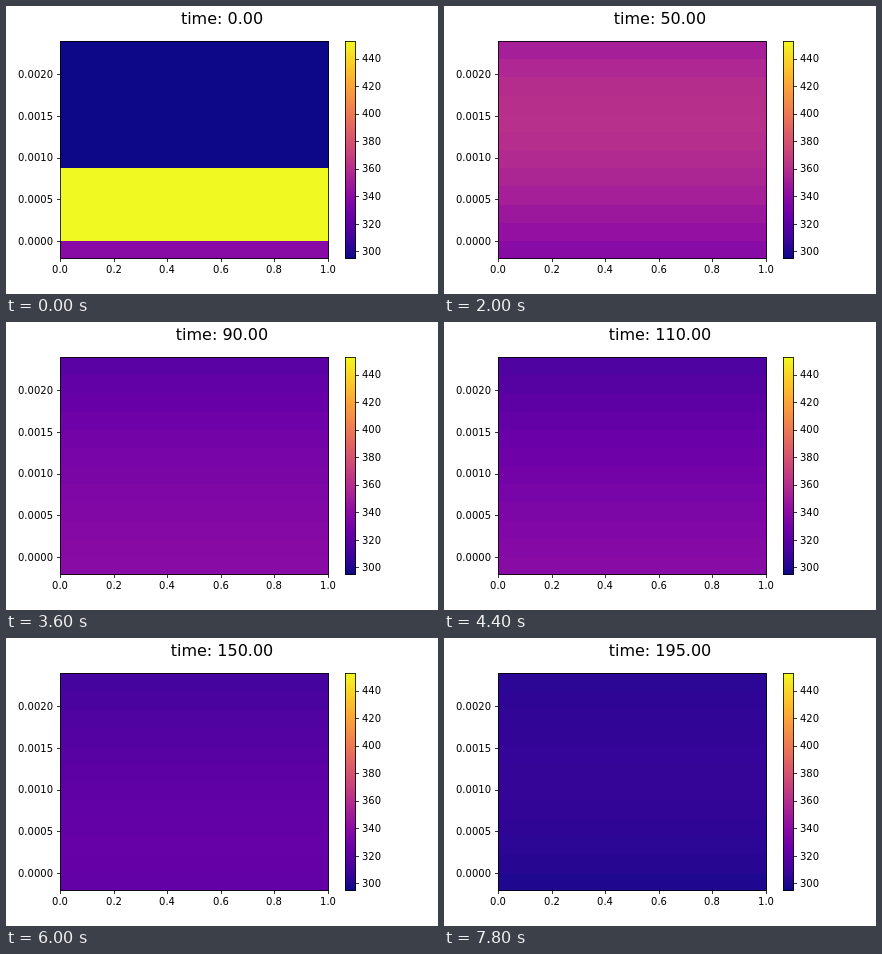
An HTML page for the animation above (8 s loop, 432 by 288 pixels).

```html
<!DOCTYPE html>
<html lang="en">
<head>
<meta charset="utf-8">
<title>Layer temperature</title>
<style>
  html, body { margin: 0; width: 100%; height: 100%; overflow: hidden; background: #fff; }
  svg { display: block; width: 432px; height: 288px; }
  text { font: 10px "DejaVu Sans", sans-serif; }
  #title { font-size: 16px; }
  .line { fill: none; stroke: #000; stroke-width: 0.8; }
</style>
</head>
<body>
<svg viewBox="0 0 432 288">
  <defs><linearGradient id="plasma" x1="0" y1="1" x2="0" y2="0"></linearGradient></defs>
  <g id="rows" shape-rendering="crispEdges"></g>
  <rect x="339" y="35" width="11" height="218" fill="url(#plasma)"/>
  <rect class="line" x="54.5" y="35.5" width="268" height="217"/>
  <rect class="line" x="339.5" y="35.5" width="10" height="217"/>
  <g id="axes"></g>
  <text id="title" x="216" y="18" text-anchor="middle"></text>
</svg>
<script>
const TOP = 34.56, BOTTOM = 252, LEFT = 54, WIDTH = 267.84;
const HEIGHT = BOTTOM - TOP;
const AMBIENT = 295.15, NOZZLE = 453.15, BED = 340;
const ROWS = 12, CELLS = 13, LAYER = 4;
const FRAMES = 40, FRAME_MS = 200, FRAME_SECONDS = 5;
const PLASMA = ['0d0887', '41049d', '6a00a8', '8f0da4', 'b12a90', 'cc4778',
  'e16462', 'f2844b', 'fca636', 'fcce25', 'f0f921']
  .map(hex => [0, 2, 4].map(i => parseInt(hex.slice(i, i + 2), 16)));

const byId = id => document.getElementById(id);

function add(parent, tag, attrs, text = '') {
  const node = document.createElementNS('http://www.w3.org/2000/svg', tag);
  for (const key in attrs) node.setAttribute(key, attrs[key]);
  node.textContent = text;
  return parent.appendChild(node);
}

function color(kelvin) {
  const f = Math.min(1, Math.max(0, (kelvin - AMBIENT) / (NOZZLE - AMBIENT))) * 10;
  const i = Math.min(9, Math.floor(f));
  const mix = PLASMA[i].map((c, k) => Math.round(c + (PLASMA[i + 1][k] - c) * (f - i)));
  return `rgb(${mix})`;
}

// Heat conduction through stacked hot layers on a bed that cools late in the run.
function simulate() {
  const dt = 0.05, diffusion = 1.25, surfaceLoss = 0.15;
  const layerSteps = 17 / dt, frameSteps = FRAME_SECONDS / dt;
  const history = [];
  let temps = Array(CELLS).fill(AMBIENT), top = 0;
  for (let step = 0; history.length < FRAMES; step++) {
    temps[0] = BED - 0.52 * Math.max(0, step * dt - 120);
    if (step % layerSteps === 0 && top < CELLS - 1) {
      temps.fill(NOZZLE, top + 1, top + 1 + LAYER);
      top += LAYER;
    }
    if (step % frameSteps === 0) history.push(temps.slice(0, ROWS));
    temps = temps.map((t, i) => {
      if (i === 0 || i > top) return t;
      const upper = i === top ? surfaceLoss * (AMBIENT - t) : temps[i + 1] - t;
      return t + diffusion * dt * (temps[i - 1] - t + upper);
    });
  }
  return history;
}

const snap = v => Math.floor(v + 0.5) + 0.5;
const axes = byId('axes');

function tick(path, x, y, anchor, label) {
  add(axes, 'path', { class: 'line', d: path });
  add(axes, 'text', { x, y: Math.round(y), 'text-anchor': anchor }, label);
}

for (let i = 0; i <= 5; i++) {
  const x = LEFT + WIDTH * i / 5;
  tick(`M${snap(x)} 252.5v3.5`, Math.round(x), 267, 'middle', (i / 5).toFixed(1));
}
for (let i = 0; i <= 4; i++) {
  const y = BOTTOM - HEIGHT * (0.2 + i * 0.5) / 2.6;
  tick(`M54.5 ${snap(y)}h-3.5`, 47, y + 3.7, 'end', (i * 0.0005).toFixed(4));
}
for (let k = 300; k <= 440; k += 20) {
  const y = BOTTOM - HEIGHT * (k - AMBIENT) / (NOZZLE - AMBIENT);
  tick(`M349.5 ${snap(y)}h3.5`, 356, y + 3.7, 'start', k);
}
PLASMA.forEach((c, i) =>
  add(byId('plasma'), 'stop', { offset: i / 10, 'stop-color': `rgb(${c})` }));

// The rows fill the whole framed box, reaching under its border.
const edge = i => Math.round(253 - 218 * i / ROWS);
const rows = Array.from({ length: ROWS }, (_, i) =>
  add(byId('rows'), 'rect', { x: LEFT, y: edge(i + 1), width: 269, height: edge(i) - edge(i + 1) }));

const history = simulate();
let shown = -1;

function draw(now) {
  const frame = Math.floor(now / FRAME_MS) % FRAMES;
  if (frame !== shown) {
    shown = frame;
    rows.forEach((row, i) => row.setAttribute('fill', color(history[frame][i])));
    byId('title').textContent = `time: ${(frame * FRAME_SECONDS).toFixed(2)}`;
  }
}

const start = performance.now();
function loop() {
  draw(performance.now() - start);
  requestAnimationFrame(loop);
}
loop();
</script>
</body>
</html>
```
